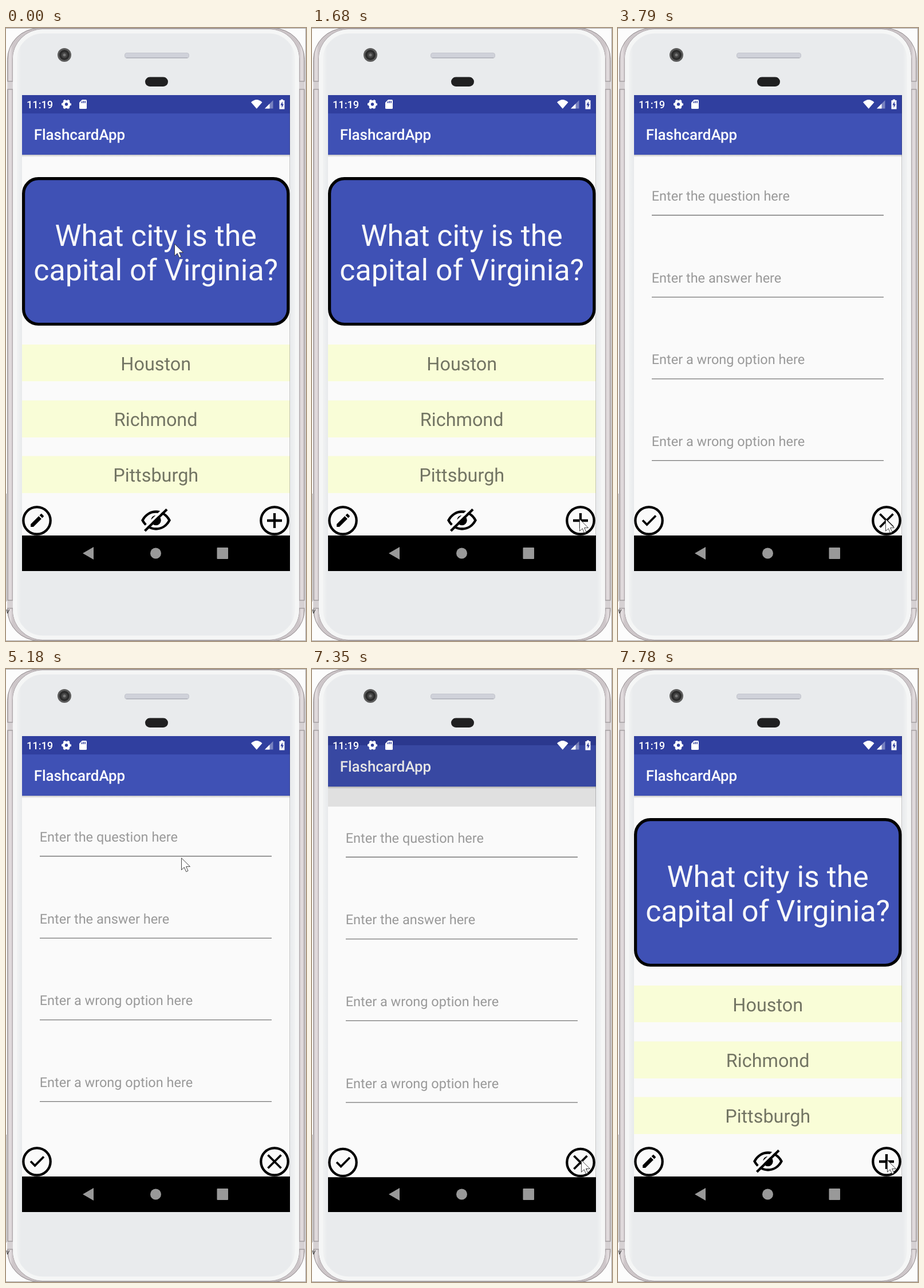
Write an HTML page that moves like this. It is 524 px wide and 1069 px high and loops after 8 s.

```html
<!DOCTYPE html>
<html lang="en">
<head>
<meta charset="utf-8">
<title>FlashcardApp</title>
<style>
  html, body { margin: 0; width: 100%; height: 100%; overflow: hidden; background: #fcfcfc; }
  svg { position: absolute; left: 0; top: 0; display: block; }
  text { font-family: Roboto, sans-serif; text-rendering: geometricPrecision; }

  .stage { position: absolute; left: 0; top: 0; width: 524px; height: 1069px; overflow: hidden; }
  .display { position: absolute; left: 28px; top: 117px; width: 468px; height: 830px; overflow: hidden; background: #000; }
  .screen { position: absolute; left: 0; top: 0; width: 468px; height: 768px; overflow: hidden; }

  .main { animation: main 8s step-end infinite; }
  .add { animation: add 8s step-end infinite; }
  .cursor { animation: cursor 8s step-end infinite; }

  .title { font-size: 25.9px; font-weight: 500; fill: #fff; }
  .question { font-size: 51.9px; fill: #fafafa; text-anchor: middle; }
  .option { font-size: 32.4px; fill: #000; fill-opacity: .54; text-anchor: middle; }
  .hint { font-size: 23.5px; fill: #999; }
  .line { fill: none; stroke: #000; stroke-width: 4.3; }
  .thin { stroke-width: 3.8; }

  @keyframes main {
    0% { transform: translateY(0); opacity: 1; }
    43.625% { transform: translateY(-6.1px); opacity: .9; }
    45.5% { transform: translateY(-15.1px); opacity: .9; }
    47.375% { transform: translateY(-16.6px); opacity: .9; }
    91.875% { transform: translateY(-15.9px); opacity: .9; }
    93.5% { transform: translateY(-6.8px); opacity: .916; }
    95.375% { transform: translateY(-.8px); opacity: 1; }
    97.25%, 100% { transform: translateY(0); opacity: 1; }
  }
  @keyframes add {
    0% { visibility: hidden; }
    43.625% { visibility: visible; transform: translateY(21.5px); clip-path: inset(129.5px 0 0); }
    45.5% { visibility: visible; transform: translateY(3px); clip-path: inset(18.5px 0 0); }
    47.375% { visibility: visible; transform: translateY(0); clip-path: inset(0); }
    91.875% { visibility: visible; transform: translateY(1.5px); clip-path: inset(121.5px 0 0); }
    93.5% { visibility: visible; transform: translateY(20px); clip-path: inset(718px 0 0); }
    95.375%, 100% { visibility: hidden; }
  }
  @keyframes cursor {
    0% { transform: translate(294px, 376px); }
    6.25% { transform: translate(296px, 440px); }
    7.875% { transform: translate(300px, 533px); }
    9.75% { transform: translate(338px, 679px); }
    11.625% { transform: translate(374px, 756px); }
    13.5% { transform: translate(410px, 796px); }
    15.375% { transform: translate(431px, 835px); }
    17.25% { transform: translate(443px, 849px); }
    19.125% { transform: translate(454px, 856px); }
    21% { transform: translate(467px, 856px); }
    59% { transform: translate(394px, 418px); }
    61% { transform: translate(370px, 336px); }
    62.875% { transform: translate(353px, 296px); }
    64.75% { transform: translate(306px, 329px); }
    66.625% { transform: translate(284px, 460px); }
    68.125% { transform: translate(300px, 645px); }
    70% { transform: translate(410px, 846px); }
    76.25% { transform: translate(413px, 846px); }
    78.125% { transform: translate(428px, 847px); }
    79.625% { transform: translate(443px, 848px); }
    81.5% { transform: translate(461px, 853px); }
    83.375%, 100% { transform: translate(470px, 856px); }
  }
</style>
</head>
<body>
<div class="stage">

  <!-- Phone body -->
  <svg width="524" height="1069" viewBox="0 0 524 1069">
    <defs>
      <linearGradient id="metal">
        <stop offset="0" stop-color="#bdb6b8"/>
        <stop offset=".008" stop-color="#e6e0e2"/>
        <stop offset=".018" stop-color="#cdc6c9"/>
        <stop offset=".982" stop-color="#cdc6c9"/>
        <stop offset=".992" stop-color="#e6e0e2"/>
        <stop offset="1" stop-color="#bdb6b8"/>
      </linearGradient>
      <linearGradient id="face">
        <stop offset="0" stop-color="#fafafa"/>
        <stop offset=".012" stop-color="#f3f4f4"/>
        <stop offset=".03" stop-color="#e9ebed"/>
        <stop offset=".97" stop-color="#e9ebed"/>
        <stop offset=".988" stop-color="#f3f4f4"/>
        <stop offset="1" stop-color="#fafafa"/>
      </linearGradient>
      <linearGradient id="shade" x2="0" y2="1">
        <stop offset="0" stop-opacity=".22"/>
        <stop offset="1" stop-opacity="0"/>
      </linearGradient>
    </defs>
    <path d="M0 .5H524M523.5 0V1069M0 1068.5H524M.5 812V1000" stroke="#a9a6a8"/>
    <rect x="2.500" y=".5" width="519" height="1068" rx="55" fill="url(#metal)" stroke="#8f888b"/>
    <rect x="11.500" y="2" width="501" height="1065" rx="52" fill="url(#face)" stroke="#aaa3a6"/>
    <rect x="15.500" y="6" width="493" height="1057" rx="49" fill="none" stroke="#f5f6f6" stroke-width="7"/>
    <path d="M2 92.500H12V107.500H2zM512 92.500H522V107.500H512zM2 997.500H12V1012.500H2zM512 997.500H522V1012.500H512z" fill="#d6d1d3"/>
    <path d="M2 93H12M2 107H12M512 93H522M512 107H522M2 998H12M2 1012H12M512 998H522M512 1012H522" stroke="#8c8789"/>
    <text x="0" y="1021" font-size="13" font-style="italic" fill="#333">v</text>
    <circle cx="102" cy="47" r="12" fill="#5c5c5c"/>
    <circle cx="102" cy="47" r="9" fill="#2b2b2b"/>
    <circle cx="102" cy="47" r="5.500" fill="#444"/>
    <circle cx="102" cy="47" r="2.500" fill="#777"/>
    <rect x="207.500" y="43.500" width="112" height="9" rx="3.500" fill="#d0d2da" stroke="#c3c5cd"/>
    <path d="M210 52H317" stroke="#a4a6ae"/>
    <rect x="243" y="85.500" width="40" height="16.500" rx="8.250" fill="#202021"/>
  </svg>

  <div class="display">
    <!-- Flashcard -->
    <div class="screen main">
      <svg width="468" height="768" viewBox="28 117 468 768">
        <defs>
          <g id="bars">
            <path d="M28 117H496V885H28z" fill="#fafafa"/>
            <path d="M28 221H496V225H28z" fill="url(#shade)"/>
            <path d="M28 117H496V149H28z" fill="#303f9f"/>
            <path d="M28 149H496V221H28z" fill="#3f51b5"/>
            <text class="title" x="48.700" y="194.500">FlashcardApp</text>
          </g>
          <circle id="ring" cy="859" r="23.700" class="line"/>
        </defs>
        <use href="#bars"/>
        <rect x="30.600" y="262.700" width="462.300" height="253.800" rx="26" fill="#3f51b5" stroke="#000" stroke-width="5.200"/>
        <text class="question" x="261.700" y="379.500">What city is the</text>
        <text class="question" x="261.700" y="440">capital of Virginia?</text>
        <path d="M28 552H496V616H28zM28 649.500H496V714H28zM28 746.500H496V811H28z" fill="#f9fdd7"/>
        <text class="option" x="261.700" y="597">Houston</text>
        <text class="option" x="261.700" y="694">Richmond</text>
        <text class="option" x="261.700" y="791">Pittsburgh</text>

        <use href="#ring" x="54"/>
        <path transform="translate(39.300 843.300) scale(1.270)" d="M3 17.250V21h3.750L17.810 9.940l-3.750-3.750zM20.710 7.040c.39-.39.39-1.020 0-1.410l-2.340-2.340c-.39-.39-1.020-.39-1.410 0l-1.830 1.830 3.750 3.750z"/>
        <path class="line" d="M238.500 858.500C249 838.500 275 838.500 285.500 858.500C275 878.500 249 878.500 238.500 858.500z"/>
        <circle cx="262" cy="858.500" r="8.700"/>
        <path class="line" style="stroke:#fafafa" d="M240 873.500L278 836.500"/>
        <path class="line" d="M242.500 877L281 839.500"/>
        <use href="#ring" x="469"/>
        <path class="line" d="M456 859H482M469 846V872"/>
      </svg>
    </div>

    <!-- New card form -->
    <div class="screen add">
      <svg width="468" height="768" viewBox="28 117 468 768">
        <use href="#bars"/>
        <text class="hint" x="58.700" y="301">Enter the question here</text>
        <text class="hint" x="58.700" y="443.600">Enter the answer here</text>
        <text class="hint" x="58.700" y="586.200">Enter a wrong option here</text>
        <text class="hint" x="58.700" y="729">Enter a wrong option here</text>
        <path d="M59 326.500H464M59 469.300H464M59 611.800H464M59 754.400H464" stroke="#757575" stroke-width="1.300"/>
        <use href="#ring" x="54"/>
        <path class="line thin" d="M43 858.500L50.500 866L66 850.500"/>
        <use href="#ring" x="469"/>
        <path class="line thin" d="M457.500 847.500L480.500 870.500M480.500 847.500L457.500 870.500"/>
      </svg>
    </div>

    <!-- System icons -->
    <svg width="468" height="830" viewBox="28 117 468 830">
      <g fill="#fff">
        <text x="36" y="140" font-size="18.200" font-weight="500">11:19</text>
        <circle cx="105.500" cy="133" r="4.800" fill="none" stroke="#fff" stroke-width="4.200"/>
        <circle cx="105.500" cy="133" r="7.200" fill="none" stroke="#fff" stroke-width="2.600" stroke-dasharray="3.770" stroke-dashoffset="1.880"/>
        <path d="M133 125H139.500Q141 125 141 126.500V139.500Q141 141 139.500 141H129.500Q128 141 128 139.500V130z"/>
        <path d="M132.500 128V131M135.300 127V131M138.100 127V131" stroke="#303f9f" stroke-width="1.500"/>
        <path d="M428 129.500Q437.800 120.500 447.500 129.500L437.800 140.800z"/>
        <path d="M452 140.500L466.500 126V140.500z" opacity=".35"/>
        <path d="M452 140.500L460.500 132V140.500z"/>
        <path d="M480 124.500H484V126H486.500V141.500H477.500V126H480z"/>
        <path d="M483 128L479.300 134.500H481.600V139.500L485 132.800H483z" fill="#303f9f"/>
      </g>
      <g fill="#999">
        <path d="M134 916L153 905V927z"/>
        <circle cx="261.500" cy="916" r="9.500"/>
        <rect x="368.500" y="906" width="19.500" height="20" rx="1"/>
      </g>
      <path d="M495.500 117V947" stroke="#000" stroke-opacity=".2"/>
    </svg>
  </div>

  <svg class="cursor" width="18" height="27" viewBox="0 0 18 27">
    <path d="M.5 .7V21.300L5.300 16.900L8.700 24.500L12 23L8.600 15.600H15.500z" fill="#fff" stroke="#333" stroke-width=".9"/>
  </svg>
</div>
</body>
</html>
```
